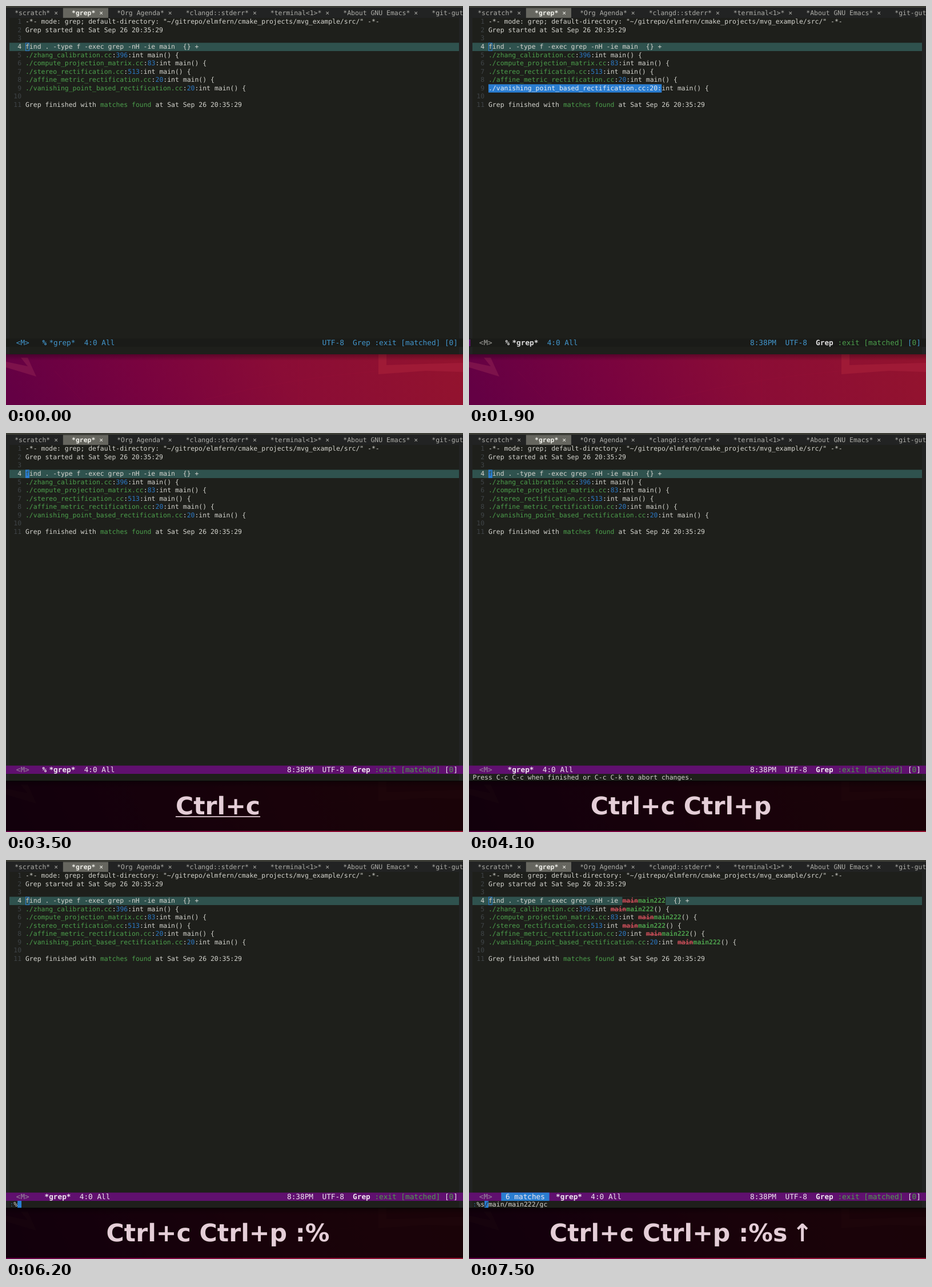
Write an HTML page with a canvas that moves like this. It is 800 px wide and 700 px high and loops after 8000 ms.

```html
<!DOCTYPE html>
<html lang="en">
<head>
<meta charset="utf-8">
<title>Editing grep results</title>
<style>
html, body { margin: 0; width: 100%; height: 100%; overflow: hidden; background: #1e1f1b; }
canvas { display: block; width: 800px; height: 700px; }
</style>
</head>
<body>
<canvas id="stage" width="800" height="700"></canvas>
<script>
const ctx = document.getElementById('stage').getContext('2d');
ctx.textRendering = 'geometricPrecision';

const LOOP = 8000;
const MONO = '"DejaVu Sans Mono", monospace';
const ADVANCE = 0.602;
const BODY = 11.453, MODE = 12.72;
const CELL = BODY * ADVANCE, MODE_CELL = MODE * ADVANCE;
const GRID_X = 6.4, TEXT_X = GRID_X + 4 * CELL;
const LINE_H = 14.56, FIRST_LINE = 20.8, ASCENT = 10.5;
const WINDOW_END = 611;
const C = {
  bg: '#1e1f1b', fringe: '#222323', bar: '#1a1b18', strip: '#3b3c35', tab: '#66665f',
  text: '#d4d4ce', dim: '#3f4447', ghost: '#454b4e', green: '#4c9f4c', blue: '#2b79c6',
  modeBlue: '#4296cc', cursor: '#2a7dd1', line: '#2f524e', purple: '#60106f',
  white: '#eee6ef', gray: '#80807c', grayOnPurple: '#8a6c91', red: '#c44d57',
  prompt: '#2d648c', key: '#e4ced7'
};

const HITS = [
  ['zhang_calibration', 396], ['compute_projection_matrix', 83], ['stereo_rectification', 513],
  ['affine_metric_rectification', 20], ['vanishing_point_based_rectification', 20]
];
const TABS = ['*scratch*', '*grep*', '*Org Agenda*', '*clangd::stderr*', '*terminal<1>*',
  '*About GNU Emacs*', '*git-gutter*'];
const KEYS = [
  { at: 3500, off: 3700, text: '', last: 'Ctrl+c' },
  { at: 4000, off: 4100, text: 'Ctrl+c ', last: 'Ctrl+p' },
  { at: 5700, off: 5800, text: 'Ctrl+c Ctrl+p ', last: ':' },
  { at: 6100, off: 6200, text: 'Ctrl+c Ctrl+p :', last: '%' },
  { at: 6900, off: 7000, text: 'Ctrl+c Ctrl+p :%', last: 's' },
  { at: 7200, off: 7400, text: 'Ctrl+c Ctrl+p :%s ', last: '↑' }
];

const lineTop = n => FIRST_LINE + (n - 1) * LINE_H;

function rect(x, y, w, h, color) {
  ctx.fillStyle = color;
  ctx.fillRect(x, y, w, h);
}

function shape(points, color) {
  ctx.fillStyle = color;
  ctx.beginPath();
  points.forEach(([x, y]) => ctx.lineTo(x, y));
  ctx.fill();
}

// Each run is [text, colour, bold]; returns the x after the last run.
function write(x, y, size, ...runs) {
  for (const [text, color, bold] of runs) {
    ctx.font = `${bold ? 'bold ' : ''}${size}px ${MONO}`;
    ctx.fillStyle = color;
    ctx.fillText(text, x, y);
    x += text.length * size * ADVANCE;
  }
  return x;
}

function drawWallpaper() {
  const base = ctx.createLinearGradient(20, 700, 690, 390);
  [[0, '#640044'], [0.3, '#79033f'], [0.6, '#8a0c36'], [1, '#93132e']]
    .forEach(([stop, color]) => base.addColorStop(stop, color));
  rect(0, 610, 800, 90, base);
  shape([[0, 624], [38, 632], [26, 617], [38, 617], [53, 650], [0, 634]], '#7d124b');
  shape([[652, 611], [666, 611], [666, 630], [800, 626], [800, 642], [735, 640], [652, 646]], '#9f1a36');
  ctx.strokeStyle = 'rgba(200,40,80,0.07)';
  ctx.lineWidth = 1;
  ctx.beginPath();
  ctx.moveTo(512, 620);
  ctx.lineTo(512, 700);
  ctx.moveTo(350, 690);
  ctx.quadraticCurveTo(500, 652, 655, 640);
  ctx.moveTo(85, 640);
  ctx.lineTo(140, 700);
  ctx.stroke();
  const shadow = ctx.createLinearGradient(0, WINDOW_END, 0, WINDOW_END + 11);
  shadow.addColorStop(0, 'rgba(0,0,0,0.3)');
  shadow.addColorStop(1, 'rgba(0,0,0,0)');
  rect(0, WINDOW_END, 800, 11, shadow);
}

function drawTabs() {
  rect(0, 0, 800, FIRST_LINE, C.fringe);
  rect(0, 0, 800, 3, C.strip);
  let x = 15.2;
  TABS.forEach((name, i) => {
    const active = i === 1, width = (name.length + 2) * CELL;
    if (active) rect(x - 15.2, 3.5, width + 24, FIRST_LINE - 3.5, C.tab);
    const color = active ? '#f0f0ea' : '#adada8';
    write(x, 16.2, BODY, [name, color, active], [' ×', color]);
    x += width + 24;
  });
}

function drawBuffer(t) {
  const preview = t >= 7500;
  const focused = t >= 2500 && t < 5700;
  const hovered = t >= 1900 && t < 2000 ? 9 : t >= 2000 && t < 2100 ? 5 : 0;
  const main = preview ? [['main', C.red, true], ['main222', C.green, true]] : [['main', C.text]];
  const put = (n, ...runs) => write(TEXT_X, lineTop(n) + ASCENT, BODY, ...runs);
  const strike = (n, col) => {
    if (preview) rect(TEXT_X + col * CELL, lineTop(n) + 7.2, 4 * CELL, 1, C.red);
  };

  rect(0, FIRST_LINE, 800, WINDOW_END - FIRST_LINE, C.fringe);
  rect(6, FIRST_LINE, 787, WINDOW_END - FIRST_LINE, C.bg);
  rect(6, lineTop(4), 787, LINE_H, C.line);
  for (let n = 1; n <= 11; n++) {
    write(GRID_X + CELL, lineTop(n) + ASCENT, BODY, [String(n).padStart(2), n === 4 ? C.text : C.dim]);
  }

  put(1, ['-*- mode: grep; default-directory: "~/gitrepo/elmfern/cmake_projects/mvg_example/src/" -*-', C.text]);
  put(2, ['Grep started at Sat Sep 26 20:35:29', C.text]);

  const command = 'find . -type f -exec grep -nH -ie ';
  if (preview) rect(TEXT_X + command.length * CELL, lineTop(4), 11 * CELL, LINE_H, C.bg);
  if (focused) {
    rect(TEXT_X, lineTop(4), CELL, LINE_H, C.cursor);
  } else {
    ctx.strokeStyle = C.cursor;
    ctx.lineWidth = 1;
    ctx.strokeRect(TEXT_X + 0.5, lineTop(4) + 0.5, CELL - 1, LINE_H - 1);
  }
  put(4, ['f', focused ? C.line : C.text], [command.slice(1), C.text], ...main, ['  {} +', C.text]);
  strike(4, command.length);

  HITS.forEach(([name, row], i) => {
    const n = i + 5, file = `./${name}.cc`;
    const link = `${file}:${row}:`;
    if (n === hovered) {
      rect(TEXT_X, lineTop(n), link.length * CELL, LINE_H, C.cursor);
      put(n, [link, '#e9eef2'], ['int main() {', C.text]);
    } else {
      put(n, [file, C.green], [':', C.text], [String(row), C.blue], [':int ', C.text], ...main, ['() {', C.text]);
    }
    strike(n, link.length + 4);
  });

  put(11, ['Grep finished with ', C.text], ['matches found', C.green], [' at Sat Sep 26 20:35:29', C.text]);
}

function drawModeLine(t) {
  const active = t >= 2500, plain = t < 300;
  const y = 595.1;
  const info = active ? C.white : C.modeBlue;
  const strong = plain ? C.modeBlue : active ? C.white : '#dedede';
  const status = plain ? C.modeBlue : C.green;
  const put = (x, ...runs) => write(x, y, MODE, ...runs);

  rect(0, 583.5, 800, 14.5, active ? C.purple : C.bar);
  if (!plain && !active) rect(0, 585, 2.5, 12, C.purple);
  put(17.8, ['<M>', plain ? C.modeBlue : active ? C.grayOnPurple : C.gray, !plain]);

  let x = 67.5;
  if (t >= 7500) {
    rect(56.3, 583.5, 84.3, 14.5, C.cursor);
    put(64, ['6 matches', C.white]);
    x = 152;
  } else if (t < 4000) {
    put(63.5, ['%', strong, true]);
    x += MODE_CELL + 0.3;
  }
  put(x, ['*grep*', strong, !plain], ['  4:0 All', info]);

  if (!plain) put(492, ['8:38PM', info]);
  put(553.5, ['UTF-8', info], ['  ', info], ['Grep', strong, !plain], [' :exit [matched] ', status],
    ['[', info], ['0', status], [']', info]);
}

function drawMinibuffer(t) {
  const y = 608.4;
  const put = (...runs) => write(GRID_X, y, BODY, ...runs);
  const cursor = x => rect(x, 598, CELL, 12.5, C.cursor);
  const prompt = [':', C.prompt];
  if (t < 3800) return;
  if (t < 4000) put(['C-c-', C.text]);
  else if (t < 5700) put(['Press C-c C-c when finished or C-c C-k to abort changes.', C.text]);
  else if (t < 6100) cursor(put([':', t < 5800 ? C.modeBlue : C.prompt], ['%s/main/main222/gc', C.ghost]));
  else if (t < 6900) cursor(put(prompt, ['%', C.text]));
  else {
    const x = put(prompt, ['%s', C.text]);
    cursor(x);
    if (t >= 7400) write(x, y, BODY, ['/', C.bg], ['main/main222/gc', C.text]);
  }
}

function drawKeys(t) {
  const key = KEYS.filter(k => t >= k.at).pop();
  if (!key) return;
  rect(0, 610, 800, 88, 'rgba(0,0,0,0.82)');
  ctx.font = 'bold 42.6px "DejaVu Sans", sans-serif';
  const arrow = key.last === '↑';
  const head = ctx.measureText(key.text).width;
  const glyph = ctx.measureText(key.last).width;
  const tail = arrow ? 29 : glyph;
  const x = 371 - (head + tail) / 2;
  ctx.fillStyle = C.key;
  ctx.fillText(key.text, x, 669);
  ctx.fillText(key.last, x + head + (arrow ? 11.5 - glyph / 2 : 0), 669);
  if (t < key.off) ctx.fillRect(x + head, 672.3, tail, 1.7);
}

function draw(t) {
  drawWallpaper();
  drawBuffer(t);
  drawTabs();
  drawModeLine(t);
  drawMinibuffer(t);
  drawKeys(t);
}

const start = performance.now();
function tick() {
  draw((performance.now() - start) % LOOP);
  requestAnimationFrame(tick);
}
tick();
</script>
</body>
</html>
```
